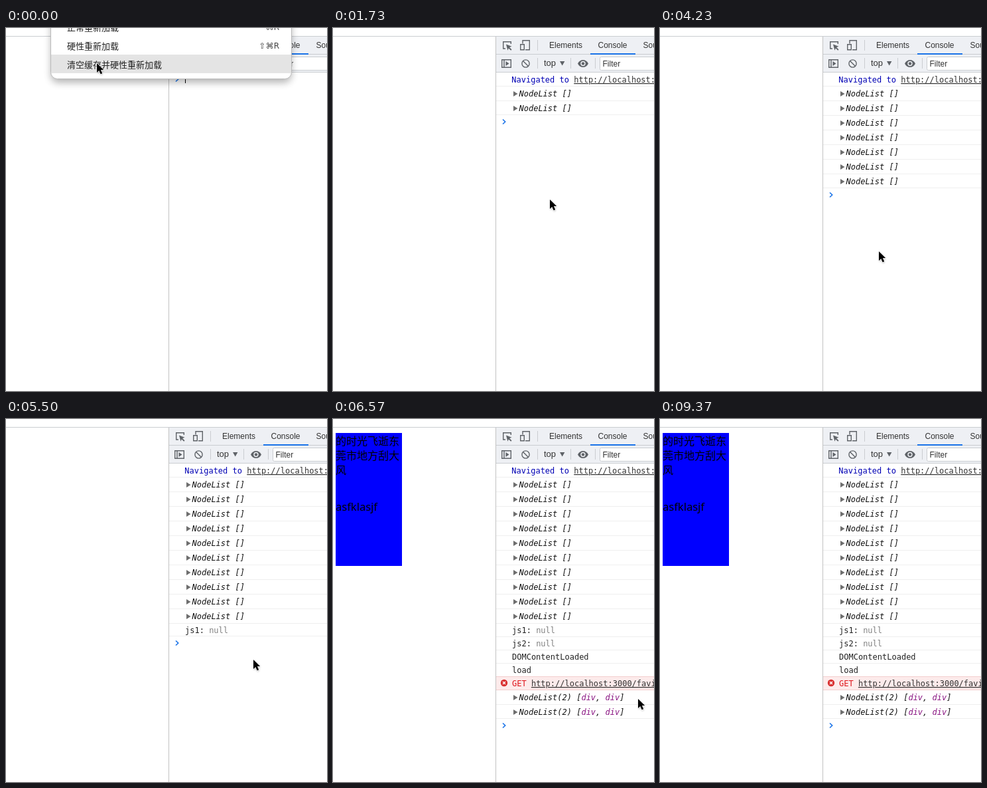
Animation, 484 px wide and 546 px high, one loop 9410 ms. Source, as an HTML page:

```html
<!DOCTYPE html>
<html lang="zh-CN">
<head>
<meta charset="utf-8">
<title>Console reload</title>
<style>
  html, body { margin: 0; width: 100%; height: 100%; overflow: hidden; background: #fff; }
  svg { display: block; width: 484px; height: 546px; }
  text { white-space: pre; }
  .ui { font: 12px "Liberation Sans", Arial, sans-serif; fill: #333; }
  .mono { font: 12px "DejaVu Sans Mono", Menlo, monospace; fill: #222; }
  .cjk { font: 13px "Noto Sans CJK SC", "Noto Sans CJK", sans-serif; fill: #222; }
  .key { font: 12px "DejaVu Sans", sans-serif; fill: #444; text-anchor: end; }
  .it { font-style: italic; fill: #111; }
  .nav { fill: #0000b4; }
  .link { fill: #333; text-decoration: underline; }
  .null { fill: #808080; }
  .tag { fill: #881280; }
  .err { fill: #e0161c; }
  .line { fill: #cacdd1; }
  .soft { fill: #efefef; }
  .icon { fill: none; stroke: #5f6368; stroke-width: 1.4; }
  .solid { fill: #5f6368; }
</style>
</head>
<body>
<svg viewBox="0 0 484 546">
  <defs>
    <filter id="blur" x="-20%" y="-40%" width="140%" height="200%"><feGaussianBlur stdDeviation="6"/></filter>
    <filter id="soft" x="-20%" y="-40%" width="140%" height="200%"><feGaussianBlur stdDeviation="1.5"/></filter>
  </defs>
  <rect width="484" height="546" fill="#fff"/>

  <g id="page">
    <rect x="4" y="21" width="100" height="200" fill="#00f"/>
    <g class="cjk" style="font-size:16px;fill:#000">
      <text x="4" y="39">的时光飞逝东</text>
      <text x="4" y="61">莞市地方刮大</text>
      <text x="4" y="83">风</text>
      <text x="4" y="138" style="font:16.5px 'Noto Sans',sans-serif">asfklasjf</text>
    </g>
  </g>

  <rect class="line" y="12" width="484" height="1"/>
  <rect x="245" y="13" width="1" height="533" fill="#c2c2c2"/>

  <g id="bar">
    <rect x="246" y="13" width="238" height="53" fill="#eef0f4"/>
    <rect class="line" x="246" y="39" width="238" height="1"/>
    <rect class="line" x="246" y="66" width="238" height="1"/>
    <rect class="line" x="308" y="18" width="1" height="16"/>
    <rect class="line" x="308" y="45" width="1" height="16"/>
    <rect class="line" x="358" y="45" width="1" height="16"/>
    <rect class="line" x="395" y="45" width="1" height="16"/>
    <rect x="388" y="38" width="68" height="2" fill="#1a73e8"/>

    <path class="icon" d="M260 31h-3.3V20.7h11.6V24"/>
    <path class="solid" d="M261 24.5l8.5 3.2-3.4 1.4 3.4 3.4-1.3 1.3-3.4-3.4-1.4 3.3z"/>
    <path class="icon" d="M286 23.5v-4.8h10.3v14H290M282.7 24.7h5.6v8h-5.6z"/>
    <path class="icon" d="M254.7 47.7h13.6v11.6h-13.6zM258 47.7v11.6"/>
    <path class="solid" d="M260.5 50v7l5-3.5z"/>
    <circle class="icon" cx="290.5" cy="53.5" r="5.6"/>
    <path class="icon" d="M286.5 49.5l8 8"/>
    <path class="solid" d="M342 50h7.4l-3.7 6.4z"/>
    <path class="solid" d="M369 53.5c3.5-7.4 12.500-7.400 16 0c-3.500 7.400-12.500 7.400-16 0z"/>
    <circle cx="377" cy="53.500" r="3.700" fill="#eef0f4"/>
    <circle class="solid" cx="377" cy="53.500" r="2.200"/>

    <text class="ui" x="326" y="30">Elements</text>
    <text class="ui" x="399.500" y="30">Console</text>
    <text class="ui" x="467.500" y="30">Sources</text>
    <text class="ui" x="318" y="57" style="font-size:13px">top</text>
    <rect x="402.500" y="43.500" width="100" height="20" rx="2" fill="#fff" stroke="#cacdd1"/>
    <text class="ui" x="406.500" y="58">Filter</text>
  </g>

  <g id="log"></g>
  <g id="prompt">
    <rect id="rule" class="soft" x="246" y="-2" width="238" height="1"/>
    <path d="M256 5.500l3.700 3.500-3.700 3.500" fill="none" stroke="#1a73e8" stroke-width="1.600"/>
    <rect id="caret" x="270" y="3" width="1" height="12" fill="#000"/>
  </g>

  <g id="tip">
    <rect x="136" y="74" width="206" height="19" rx="3" fill="#000" opacity=".35" filter="url(#soft)"/>
    <rect x="136.500" y="72.500" width="205" height="19" rx="2" fill="#dddde0" stroke="#cbcbce"/>
    <text class="cjk" x="142.500" y="86.500" style="font-size:11.300px">重新加载此网页，按下可查看更多选项</text>
  </g>

  <g id="menu">
    <rect x="68" y="-30" width="362" height="112" rx="10" fill="#000" opacity=".3" filter="url(#blur)"/>
    <rect x="67.500" y="-30" width="363" height="106.500" rx="10" fill="#fff" stroke="#bbb"/>
    <rect id="pick" x="68" y="40" width="362" height="28" fill="#e4e4e4"/>
    <text class="cjk" x="92" y="3.500">正常重新加载</text>
    <text class="cjk" x="92" y="31.500">硬性重新加载</text>
    <text class="cjk" x="92" y="59.500">清空缓存并硬性重新加载</text>
    <text class="key" x="412" y="3">⌘R</text>
    <text class="key" x="412" y="31">⇧⌘R</text>
  </g>

  <g id="mouse">
    <path d="M0 0V14L3.300 11 5.600 16.300 8.200 15.200 5.900 10.100H10.200Z" transform="translate(.5 1.500)" opacity=".35" filter="url(#soft)"/>
    <path d="M0 0V14L3.300 11 5.600 16.300 8.200 15.200 5.900 10.100H10.200Z" fill="#000" stroke="#fff" stroke-width="1.200" paint-order="stroke"/>
  </g>
</svg>
<script>
const LOOP = 9410, FIRST = 1060, TICK = 470, LOADED = 5690;
const $ = id => document.getElementById(id);
const span = (cls, s) => `<tspan class="${cls}">${s}</tspan>`;
const text = (x, y, body, cls = '') => `<text class="mono ${cls}" x="${x}" y="${y}">${body}</text>`;

const node = body => y =>
  `<path d="M272 ${y + 7}v8l6.500-4z" fill="#6e6e6e"/>` + text(280.5, y + 15, body, 'it');
const plain = body => y => text(270, y + 14, body);
const failed = y =>
  `<rect x="246" y="${y - 1}" width="238" height="21" fill="#f3cfcf"/>
   <rect x="246" y="${y}" width="238" height="19" fill="#fdebeb"/>
   <circle cx="258" cy="${y + 9}" r="5.200" fill="#d93030"/>
   <path d="M256 ${y + 7}l4 4m0-4l-4 4" stroke="#fff" stroke-width="1.300"/>` +
  text(270, y + 14, span('err', 'GET ') + span('link', 'http://localhost:3000/favicon.ico'));

const divs = node(`NodeList(2) [${span('tag', 'div')}, ${span('tag', 'div')}]`);
const nul = span('null', 'null');

// [time, height, draw]
const rows = [
  [560, 20, y => text(269.3, y + 14, span('nav', 'Navigated to ') + span('link', 'http://localhost:3000/'))],
  ...Array.from({ length: 10 }, (_, i) => [FIRST + i * TICK, 22, node('NodeList []')]),
  [5480, 20, plain('js1: ' + nul)],
  [LOADED, 20, plain('js2: ' + nul)],
  [LOADED, 20, plain('DOMContentLoaded')],
  [LOADED, 20, plain('load')],
  [LOADED + 30, 20, failed],
  [FIRST + 10 * TICK, 22, divs],
  [FIRST + 11 * TICK, 22, divs],
];

let y = 68;
const log = rows.map(([at, h, draw], i) => {
  const g = document.createElementNS('http://www.w3.org/2000/svg', 'g');
  const rule = i && rows[i - 1][2] !== failed
    ? `<rect class="soft" x="246" y="${y - 1}" width="238" height="1"/>` : '';
  g.innerHTML = rule + draw(y);
  $('log').append(g);
  y += h;
  return { at, g, end: y };
});

// [time, x, y]
const path = [
  [0, 137, 53], [580, 137, 53], [670, 146, 74], [970, 150, 184],
  [1400, 296, 246], [1650, 327, 258], [3200, 327, 258], [3430, 329, 313],
  [3830, 329, 313], [4150, 330, 336], [4800, 330, 336], [5350, 373, 362],
  [5670, 373, 362], [6500, 460, 421], [6640, 460, 421], [7400, 490, 455], [LOOP, 490, 455],
];

const clamp = v => Math.max(0, Math.min(1, v));
const show = (el, on) => el.setAttribute('visibility', on ? 'visible' : 'hidden');

function mouseAt(t) {
  const i = path.findIndex(p => p[0] > t);
  const [t0, x0, y0] = path[i - 1], [t1, x1, y1] = path[i];
  const k = (t - t0) / (t1 - t0);
  return `translate(${x0 + (x1 - x0) * k} ${y0 + (y1 - y0) * k})`;
}

function render(t) {
  let end = 68;
  for (const row of log) {
    const on = t >= row.at;
    show(row.g, on);
    if (on) end = row.end;
  }
  $('prompt').setAttribute('transform', `translate(0 ${end})`);
  show($('rule'), end > 68);
  show($('caret'), end === 68);
  show($('page'), t >= LOADED);
  show($('pick'), t < 40 || t >= 100);
  $('menu').setAttribute('opacity', 1 - clamp((t - 150) / 180));
  $('tip').setAttribute('opacity', t < 480 ? 0 : 1 - clamp((t - 720) / 160));
  $('mouse').setAttribute('transform', mouseAt(t));
}

const start = performance.now();
function frame() {
  render((performance.now() - start) % LOOP);
  requestAnimationFrame(frame);
}
frame();
</script>
</body>
</html>
```
